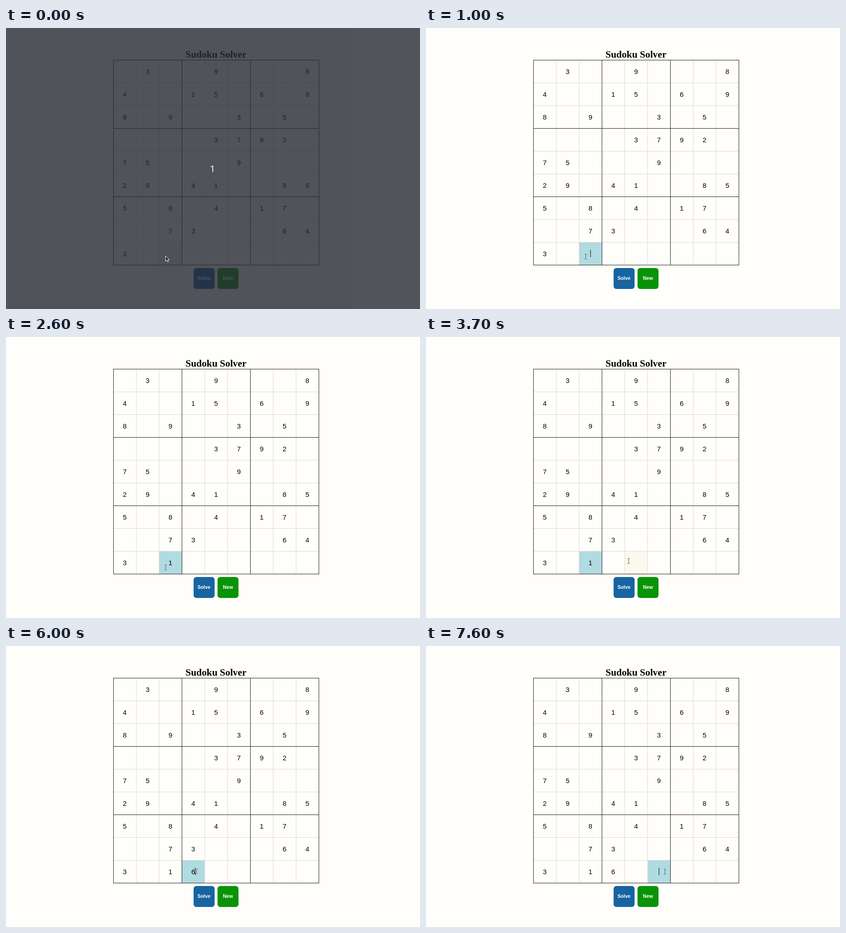
Recreate the animation shown at these times as an HTML page. Size 907x617 px, loop 8 s.

```html
<!DOCTYPE html>
<html lang="en">
<head>
<meta charset="utf-8">
<title>Sudoku Solver</title>
<style>
  html, body { margin: 0; width: 100%; height: 100%; overflow: hidden; background: #fffefb; }
  svg { display: block; }
  text { text-anchor: middle; font: 15px "Liberation Sans", Arial, sans-serif; }
  .title { font: bold 21.33px "Liberation Serif", serif; }
  .label { font-weight: bold; font-size: 10.67px; fill: #fff; }
  .count { font: 20px "Noto Sans", "Open Sans", sans-serif; fill: #fff; }
  rect { shape-rendering: crispEdges; }
  .button { shape-rendering: auto; }
</style>
</head>
<body>
<svg width="907" height="617" viewBox="0 0 907 617">
  <text class="title" x="460" y="65">Sudoku Solver</text>
  <rect id="hover" y="471" width="49" height="49" fill="#fdf8ee"/>
  <rect id="focus" y="471" width="49" height="49" fill="#b0dbe1"/>
  <g id="thin" fill="#d8d8d9"></g>
  <g id="thick" fill="#1c1c20"></g>
  <g id="digits"></g>
  <rect id="caret" y="487" width="1" height="16"/>
  <rect class="button" x="411" y="527" width="46" height="46" rx="6" fill="#1764a1"/>
  <rect class="button" x="463.4" y="527" width="46" height="46" rx="6" fill="#089406"/>
  <text class="label" x="433.7" y="553">Solve</text>
  <text class="label" x="486.3" y="553">New</text>
  <g id="beam" fill="none">
    <path d="M-2-5.5H2M-2 5.5H2M0-5.5V5.5" stroke="#fff" stroke-opacity=".4" stroke-width="2"/>
    <path d="M-2.5-5.5H-.8L0-4.7 .8-5.5H2.5M-2.5 5.5H-.8L0 4.7 .8 5.5H2.5M0-5V5" stroke="#4a4a4a"/>
  </g>
  <g id="countdown">
    <rect width="907" height="617" fill="rgb(38,41,51)" fill-opacity=".8"/>
    <text class="count" x="452.5" y="316">1</text>
    <path d="M349.5 500.5V512L352.2 509.5 354 513.7 356 512.8 354.2 508.8H358Z" fill="#222" stroke="#fff"/>
  </g>
</svg>
<script>
const LEFT = 235, TOP = 70, CELL = 50, LOOP = 8000, TICK = 100, BLINK = 600;
const puzzle = [
  '.3..9...8', '4..15.6.9', '8.9..3.5.',
  '....3792.', '75...9...', '29.41..85',
  '5.8.4.17.', '..73...64', '3........'
];

// Each edit focuses a bottom-row cell and may type a digit into it.
const edits = [
  { col: 2, start: 1000, typed: 1900, end: 4800, digit: 1 },
  { col: 3, start: 4900, typed: 6000, end: 7500, digit: 6 },
  { col: 5, start: 7600, typed: LOOP, end: LOOP, digit: '' }
];

// Pointer movements, each one starting where the previous one ended.
const home = { x: 350, y: 502 };
const glides = [
  { start: 2400, end: 2400, x: 350, y: 506 },
  { start: 2900, end: 3100, x: 355, y: 506 },
  { start: 3400, end: 3700, x: 444, y: 492 },
  { start: 3800, end: 3900, x: 420, y: 494 },
  { start: 4100, end: 4400, x: 418.5, y: 495 },
  { start: 5700, end: 5800, x: 417.5, y: 495 },
  { start: 6400, end: 7200, x: 523.5, y: 495.5, dip: 6 }
];

const el = id => document.getElementById(id);
const show = (node, on) => node.style.display = on ? '' : 'none';
const smooth = p => p * p * (3 - 2 * p);

function add(parent, tag, attrs, text = '') {
  const node = document.createElementNS('http://www.w3.org/2000/svg', tag);
  for (const key in attrs) node.setAttribute(key, attrs[key]);
  node.textContent = text;
  return el(parent).appendChild(node);
}

const addDigit = (row, col, digit) => add('digits', 'text',
  { x: LEFT + CELL * (col + .5) + .2, y: TOP + CELL * row + 31 }, digit);

for (let i = 0; i <= 9; i++) {
  const layer = i % 3 ? 'thin' : 'thick';
  add(layer, 'rect', { x: LEFT + CELL * i, y: TOP, width: 1, height: 451 });
  add(layer, 'rect', { x: LEFT, y: TOP + CELL * i, width: 451, height: 1 });
}
puzzle.forEach((line, row) => [...line].forEach((digit, col) => {
  if (digit !== '.') addDigit(row, col, digit);
}));
for (const edit of edits) edit.node = addDigit(8, edit.col, edit.digit);

function pointerAt(t) {
  let { x, y } = home;
  for (const glide of glides) {
    if (t < glide.start) break;
    const steps = (glide.end - glide.start) / TICK + 1;
    const p = Math.min(1, ((t - glide.start) / TICK + 1) / steps);
    x += (glide.x - x) * smooth(p);
    y += (glide.y - y) * smooth(p) + (glide.dip || 0) * Math.sin(Math.PI * p);
  }
  return { x, y };
}

function placeCell(node, col) {
  node.setAttribute('x', LEFT + CELL * col + 1);
}

function drawEdit(t) {
  const edit = edits.find(e => t >= e.start && t < e.end);
  show(el('focus'), edit);
  show(el('caret'), false);
  if (!edit) return;
  const typed = t >= edit.typed;
  const blinks = Math.floor((t - (typed ? edit.typed : edit.start)) / BLINK);
  placeCell(el('focus'), edit.col);
  el('caret').setAttribute('x', LEFT + CELL * (edit.col + .5) + (typed ? 4 : 0));
  show(el('caret'), blinks % 2 === 0);
}

function draw(now) {
  const t = Math.floor(now % LOOP / TICK) * TICK;
  const { x, y } = pointerAt(t);
  placeCell(el('hover'), Math.floor((x - LEFT) / CELL));
  drawEdit(t);
  for (const edit of edits) show(edit.node, t >= edit.typed);
  el('beam').setAttribute('transform', `translate(${x} ${y})`);
  show(el('beam'), t >= TICK);
  show(el('countdown'), t < TICK);
  requestAnimationFrame(draw);
}
draw(performance.now());
</script>
</body>
</html>
```
